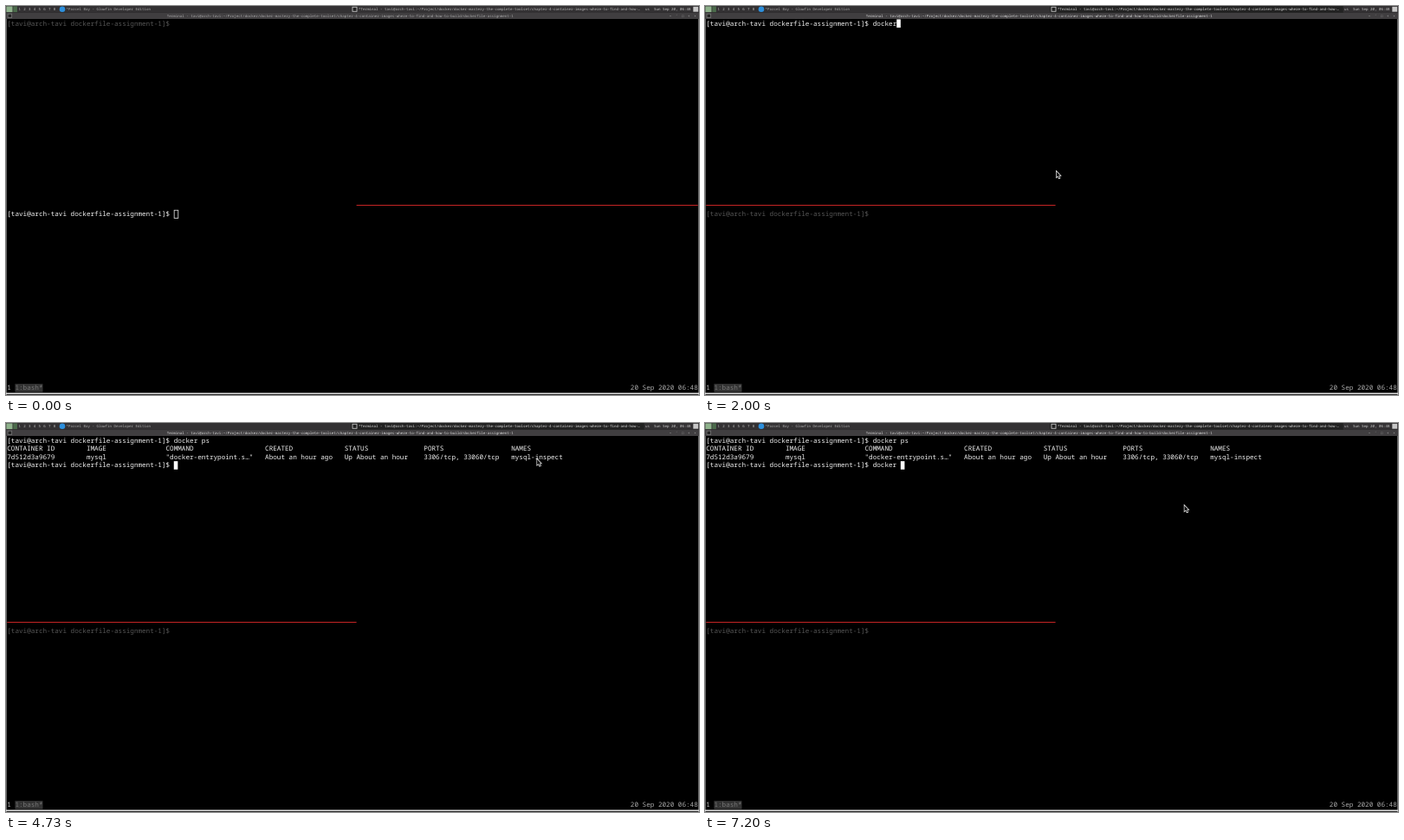
An HTML page with a canvas that plays this animation: 800 by 450 pixels, repeating every 8000 ms.

```html
<!DOCTYPE html>
<html>
<head>
<meta charset="utf-8">
<style>
html, body { margin: 0; width: 100%; height: 100%; overflow: hidden; background: #000; }
canvas { display: block; width: 800px; height: 450px; }
</style>
</head>
<body>
<canvas id="stage" width="800" height="450"></canvas>
<script>
const ctx = document.getElementById('stage').getContext('2d');
// The desktop is laid out at 1920 x 1080 and scaled down; PX is one stage pixel.
const PX = 2.4, WIDTH = 1920, HEIGHT = 1080, LOOP = 8000;
const CELL = 11, ROW = 23, LEFT = 3, TOP = 37;
const MONO = '"Noto Sans Mono", "DejaVu Sans Mono", monospace';
const BRIGHT = '#f0f0f0', DIM = '#555', RED = '#c42424';
const USER = 'tavi@arch-tavi';
const PROMPT = `[${USER} dockerfile-assignment-1]$ `;
const HOME = PROMPT.length;
const DIR = 'Terminal - ' + USER + ':~/Project/docker/docker-mastery-the-complete-toolset/' +
  'chapter-4-container-images-where-to-find-and-how-';
const TITLE = DIR + 'to-build/dockerfile-assignment-1';

// Each field is padded to the longer of its two texts plus a gap
const FIELDS = [
  ['CONTAINER ID', '7d512d3a9679        '],
  ['IMAGE', 'mysql               '],
  ['COMMAND', '"docker-entrypoint.s…"   '],
  ['CREATED', 'About an hour ago   '],
  ['STATUS', 'Up About an hour    '],
  ['PORTS', '3306/tcp, 33060/tcp   '],
  ['NAMES', 'mysql-inspect']
];
const HEADINGS = FIELDS.map(([name, value]) => name.padEnd(value.length)).join('');
const VALUES = FIELDS.map(field => field[1]).join('');

const FOCUS = 600, SWITCH = 670, TYPE = 1330, ENTER = 2600, OUTPUT = 2730, RETYPE = 6470;
const PACE = 120;

// Pointer strokes from where the last one ended
const ENTRY = { x: 414, y: 205 };
const MOVES = [
  { from: 270, to: 400, x: 405.3, y: 191 },
  { from: 3662, to: 3730, x: 500, y: 210 },
  { from: 3800, to: 4420, x: 626, y: 54 },
  { from: 4420, to: 4670, x: 612.7, y: 41.5 },
  { from: 4950, to: 5200, x: 607.5, y: 40.3 },
  { from: 5420, to: 5560, x: 553, y: 95 }
];
const ARROW = new Path2D('M1 1V17L5 13.5L8 20L10.5 19L7.5 12.5H12Z');

const typed = (text, start, t) => text.slice(0, Math.max(0, Math.floor((t - start) / PACE) + 1));

function ease(p) {
  p = Math.min(1, Math.max(0, p));
  return p * p * (3 - 2 * p);
}

function pointerAt(t) {
  let { x, y } = ENTRY;
  for (const move of MOVES) {
    const p = ease((t - move.from) / (move.to - move.from));
    x += (move.x - x) * p;
    y += (move.y - y) * p;
  }
  return [x * PX, y * PX];
}

function box(color, x, y, w, h) {
  ctx.fillStyle = color;
  ctx.fillRect(x, y, w, h);
}

function label(text, x, y, color, size = 10) {
  ctx.font = `${size}px ${MONO}`;
  ctx.fillStyle = color;
  ctx.fillText(text, x, y);
}

function put(text, col, row, color = BRIGHT) {
  label(text, LEFT + col * CELL, TOP + row * ROW + 17, color, CELL / 0.6);
}

function block(col, row, solid = true) {
  const x = LEFT + col * CELL, y = TOP + row * ROW;
  if (solid) return box('#fff', x, y, CELL, ROW);
  ctx.strokeStyle = '#ddd';
  ctx.lineWidth = 2;
  ctx.strokeRect(x + 1, y + 1, CELL, ROW - 1);
}

function drawBars(focused) {
  box('#333133', 0, 0, WIDTH, 19);
  box(focused ? '#222' : '#333133', 956, 0, 812, 19);
  box('#403e40', 0, 19, WIDTH, 17);

  box('#8fb38c', 1, 1, 17, 16);
  box('#4b6b4b', 20, 1, 11, 16);
  for (let i = 0; i < 8; i++) label(i + 1, 35 + i * 13.8, 12, '#bbb');
  ctx.fillStyle = '#2d8fdc';
  ctx.beginPath();
  ctx.arc(156, 9, 8, 0, 7);
  ctx.fill();
  label('*Parcel Bay - Glowfin Developer Edition', 167, 12, '#aaa');
  box('#d0d0d0', 959, 2, 14, 14);
  box('#222', 961, 4, 10, 10);
  label('*' + DIR + '…', 977, 12, focused ? '#ddd' : '#bbb');
  label('us', 1771, 12, '#bbb');
  label('Sun Sep 20, 06:48', 1795, 12, '#ccc');
  box('#c8c8c8', 1904, 2, 14, 14);

  box('#777', 4, 21, 13, 12);
  box('#222', 6, 23, 9, 8);
  label(TITLE, 446, 31, focused ? '#d8d8d8' : '#aaa');
  [...'▾˄□+×'].forEach((sign, i) => label(sign, 1838 + i * 17, 31, '#aaa'));
}

function drawPanes(t) {
  const top = t >= SWITCH;
  put(PROMPT, 0, 0, top ? BRIGHT : DIM);
  put(PROMPT, 0, 23, top ? DIM : BRIGHT);
  box(RED, top ? LEFT : 971, 230 * PX, top ? 968 : 946, PX);

  const command = typed('docker ps ', TYPE, t);
  put(command, HOME, 0);
  if (!top) {
    block(HOME, 23, t >= FOCUS);
  } else if (t < ENTER) {
    block(HOME + command.length, 0);
  } else if (t < OUTPUT) {
    block(0, 1);
  } else {
    const next = typed('docker ', RETYPE, t);
    put(HEADINGS, 0, 1);
    put(VALUES, 0, 2);
    put(PROMPT + next, 0, 3);
    block(HOME + next.length, 3);
  }
}

function drawStatus() {
  put('1', 0, 44, '#bbb');
  box('#333', LEFT + 2 * CELL, TOP + 44 * ROW, 7 * CELL, ROW);
  put('1:bash*', 2, 44, '#777');
  put('20 Sep 2020 06:48', 157, 44, '#aaa');
}

function drawBorder() {
  box('#666', 0, 36, PX, HEIGHT - 36);
  box('#666', WIDTH - PX, 36, PX, HEIGHT - 36);
  box('#e0e0e0', 0, 1074, WIDTH, 4);
}

function drawPointer(t) {
  if (t < MOVES[0].from) return;
  ctx.save();
  ctx.translate(...pointerAt(t));
  ctx.fillStyle = '#111';
  ctx.strokeStyle = '#fff';
  ctx.lineWidth = 3;
  ctx.stroke(ARROW);
  ctx.fill(ARROW);
  ctx.restore();
}

function draw(t) {
  ctx.setTransform(1 / PX, 0, 0, 1 / PX, 0, 0);
  ctx.textRendering = 'geometricPrecision';
  box('#000', 0, 0, WIDTH, HEIGHT);
  drawBars(t >= FOCUS);
  drawPanes(t);
  drawStatus();
  drawBorder();
  drawPointer(t);
}

const start = performance.now();
function tick() {
  draw((performance.now() - start) % LOOP);
  requestAnimationFrame(tick);
}
tick();
</script>
</body>
</html>
```
